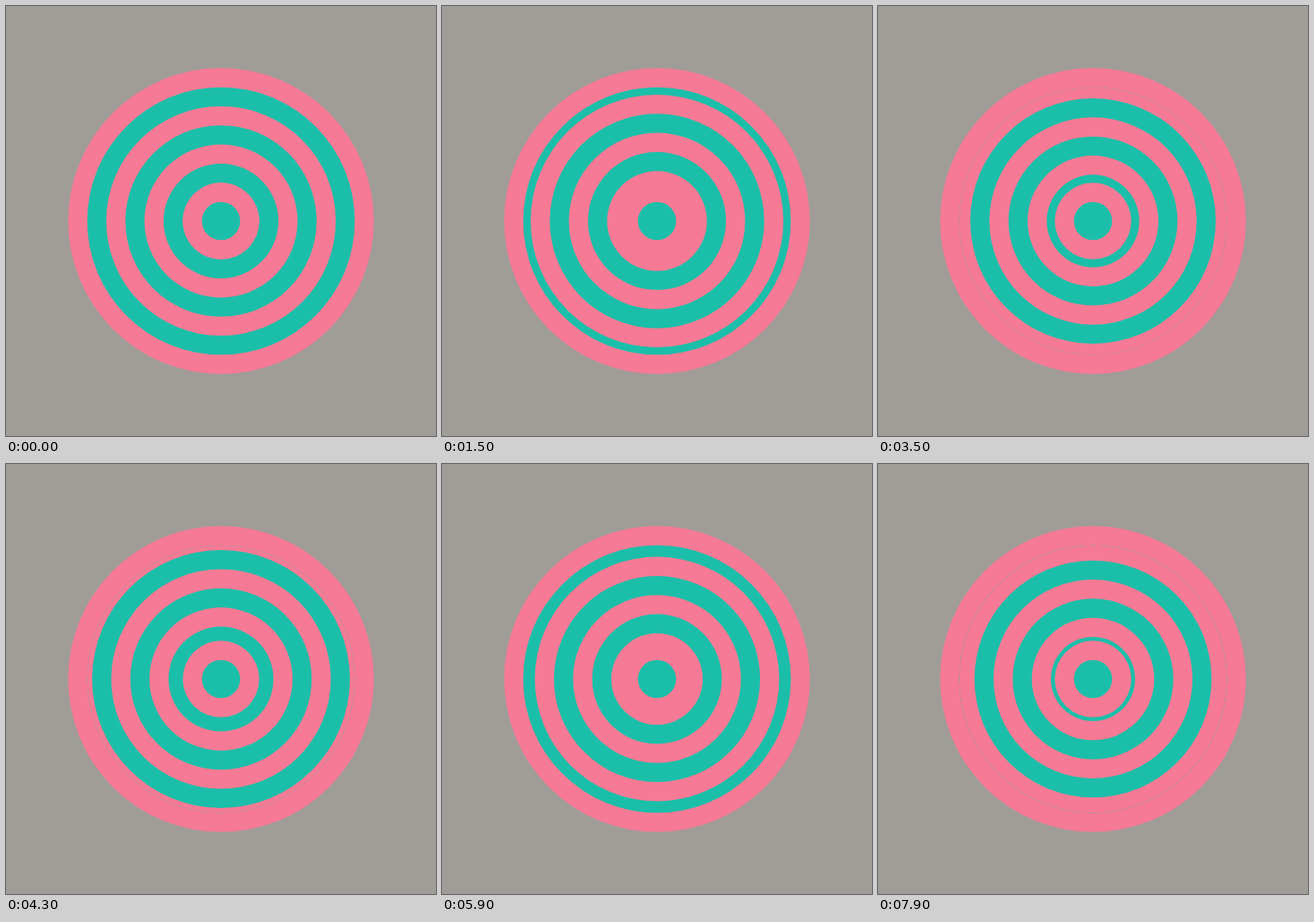
These frames come from a looping animation (480 px wide and 480 px high, 8 s). An HTML page:

```html
<!DOCTYPE html>
<html lang="en">
<head>
<meta charset="utf-8">
<title>Concentric rings</title>
<style>
  @property --grow {
    syntax: "<length>";
    inherits: true;
    initial-value: 0px;
  }
  html, body {
    margin: 0;
    width: 100%;
    height: 100%;
    overflow: hidden;
    background: #a09c98;
  }
  svg { display: block; width: 100vw; height: 100vh; }
  .pink { fill: #f67a95; }
  .teal { fill: #1bbfa9; }

  /* Ten drawn steps a second; the small lead keeps step edges stable. */
  .waves { animation: grow 8s steps(80, end) -10ms infinite; }
  .waves circle {
    r: clamp(0px, var(--k) * 21.333px + var(--grow), 149.333px);
  }
  @keyframes grow {
    from { --grow: 0.1px; }
    to { --grow: 69.2px; }
  }
</style>
</head>
<body>
<svg viewBox="0 0 480 480">
  <g transform="translate(240 240)">
    <circle class="pink" r="170.667"/>
    <g class="waves">
      <circle class="teal" style="--k:7"/>
      <circle class="pink" style="--k:6"/>
      <circle class="teal" style="--k:5"/>
      <circle class="pink" style="--k:4"/>
      <circle class="teal" style="--k:3"/>
      <circle class="pink" style="--k:2"/>
      <circle class="teal" style="--k:1"/>
      <circle class="pink" style="--k:0"/>
      <circle class="teal" style="--k:-1"/>
    </g>
    <circle class="pink" r="42.667"/>
    <circle class="teal" r="21.333"/>
  </g>
</svg>
</body>
</html>
```
